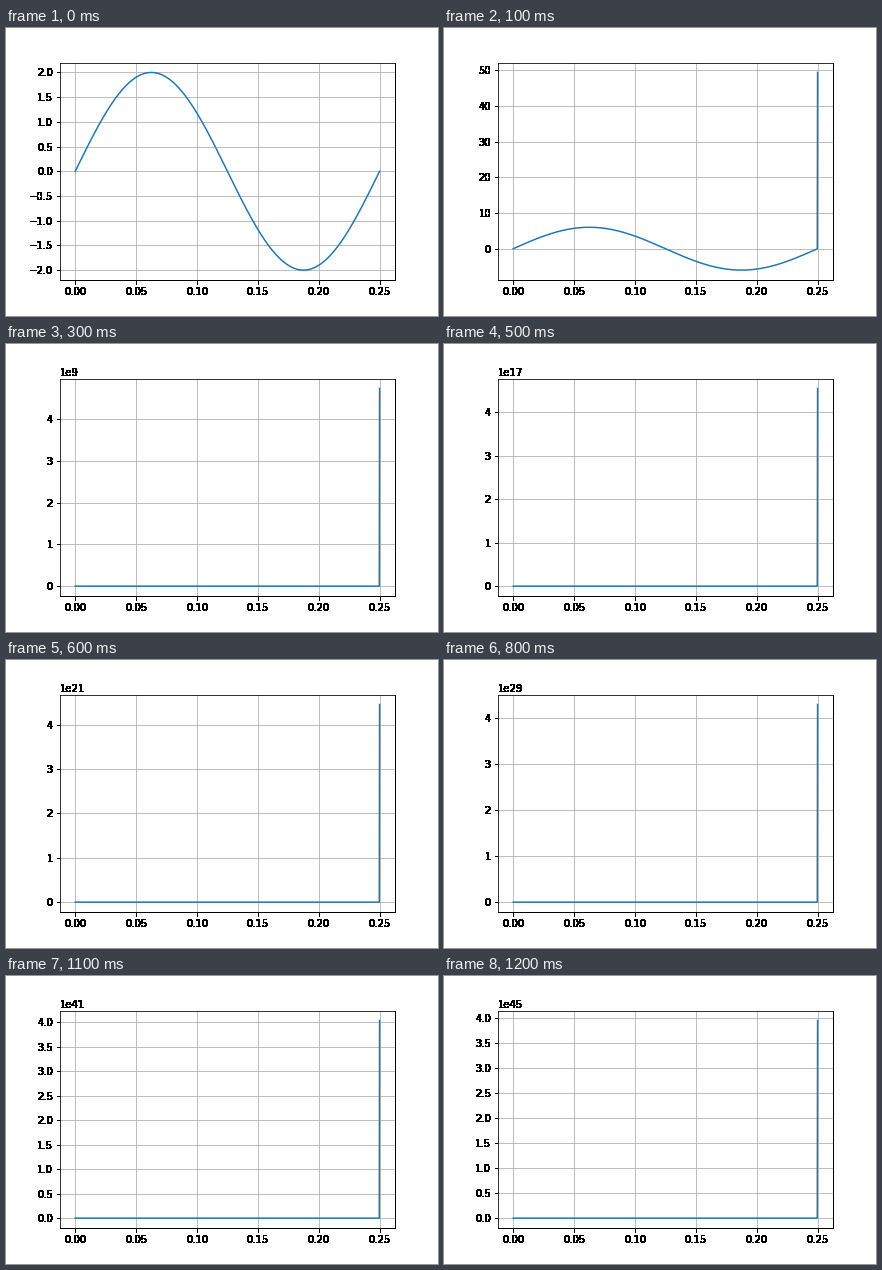
Animation, 432 px wide and 288 px high, one loop 1300 ms. Source, as a matplotlib script:

```python
import matplotlib.pyplot as plt
import numpy as np
from matplotlib.animation import FuncAnimation

STEPS = 13
GROWTH = 9800.0      # factor by which the boundary value blows up per step
FIRST_SPIKE = 49.35

x = np.linspace(0, 0.25, 1001)


def solution(step):
    """Sine wave whose unstable right boundary explodes after the first step."""
    u = 2.0 * 3.0 ** step * np.sin(8 * np.pi * x)
    if step > 0:
        u[-1] = FIRST_SPIKE * GROWTH ** (step - 1)
    return u


def harden(image, dpi):
    """Make every touched pixel opaque, so text outside the axes is not smoothed."""
    out = image.copy()
    out[..., 3] = image[..., 3] > 0
    return out, 0, 0


fig, ax = plt.subplots(figsize=(6, 4), dpi=72, facecolor="white")
fig.subplots_adjust(left=0.125, right=0.9, bottom=0.125, top=0.88)
ax.set_agg_filter(harden)
ax.grid(True)
line, = ax.plot(x, solution(0))


def update(step):
    line.set_ydata(solution(step))
    ax.relim()
    ax.autoscale_view()
    return line,


anim = FuncAnimation(fig, update, frames=STEPS, interval=100,
                     repeat=True, repeat_delay=0, blit=False)
plt.show()
```
